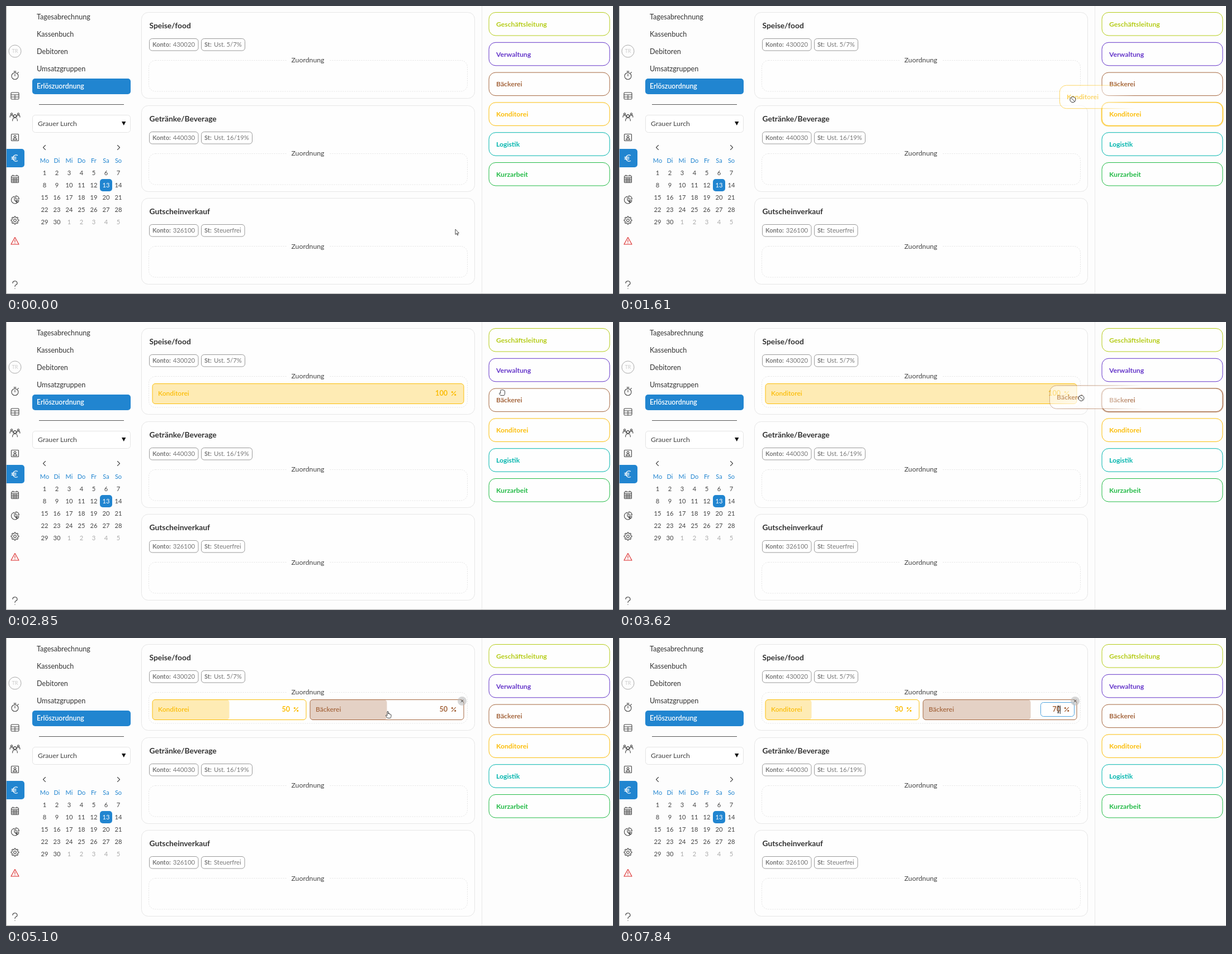
Recreate the animation shown at these times as an HTML page. Size 1086 by 516 pixels, loop 8000 ms.

```html
<!DOCTYPE html>
<html lang="de">
<head>
<meta charset="utf-8">
<title>Erlöszuordnung</title>
<style>
html, body { margin: 0; width: 100%; height: 100%; overflow: hidden; background: #fdfdfd; }
svg { display: block; width: 100vw; height: 100vh; font-family: Lato, "Open Sans", sans-serif; }
.icon { fill: none; stroke: #444; stroke-width: 1.1; stroke-linecap: round; stroke-linejoin: round; }
</style>
</head>
<body>
<svg id="stage" viewBox="0 0 1086 516"></svg>
<script>
const LOOP = 8000;
const BLUE = '#2185d0', YELLOW = '#fbbd08', BROWN = '#a5673f';
const DEPARTMENTS = [
  ['Geschäftsleitung', '#b5cc18'], ['Verwaltung', '#6435c9'], ['Bäckerei', BROWN],
  ['Konditorei', YELLOW], ['Logistik', '#00b5ad'], ['Kurzarbeit', '#21ba45']
];
const cardTop = i => 11.5 + 53.8 * i;

const text = (x, y, s, size, fill = '#333', weight = 400, anchor = 'start') =>
  `<text x="${x}" y="${y}" font-size="${size}" fill="${fill}" font-weight="${weight}" text-anchor="${anchor}">${s}</text>`;
const rect = (x, y, w, h, r, fill, stroke = 'none', extra = '') =>
  `<rect x="${x}" y="${y}" width="${w}" height="${h}" rx="${r}" fill="${fill}" stroke="${stroke}" ${extra}/>`;
const icon = (y, body, extra = '') => `<g class="icon" transform="translate(16 ${y})" ${extra}>${body}</g>`;
const path = (d, extra = '') => `<path d="${d}" ${extra}/>`;

function sidebar() {
  const teeth = Array.from({ length: 8 }, (_, i) => {
    const at = (r, k) => {
      const a = (i + k) * Math.PI / 4;
      return (r * Math.cos(a)).toFixed(2) + ' ' + (r * Math.sin(a)).toFixed(2);
    };
    return `${i ? 'L' : 'M'}${at(7, -0.18)}L${at(7, 0.18)}L${at(5.3, 0.32)}L${at(5.3, 0.68)}`;
  }).join('') + 'Z';
  const person = (x, y, r) =>
    `<circle cx="${x}" cy="${y}" r="${r}"/>` +
    path(`M${x - r * 1.8} ${y + r * 3.6}v-1a${r * 1.8} ${r * 1.8} 0 0 1 ${r * 3.6} 0v1`);
  return `<circle cx="16" cy="81" r="11" fill="none" stroke="#aaa"/>` +
    text(16, 84.3, 'TR', 9, '#ccc', 400, 'middle') +
    icon(124, '<circle cy="1.5" r="6"/>' + path('M0 1.5V-2M-2-7H2M0-7v2M5-4l1.3-1.3')) +
    icon(161, rect(-7, -6, 14, 12, 1.5, 'none', '#444') + path('M-7-2H7M-7 2H7M0-2V6')) +
    icon(198, person(0, -1, 2.4) + person(-6, -4.5, 1.6) + person(6, -4.5, 1.6)) +
    icon(235.5, rect(-6.5, -6, 13, 12, 1, 'none', '#444') + '<circle cy="-1.5" r="1.9"/>' + path('M-3.5 4a3.5 2.8 0 0 1 7 0z')) +
    path('M0 256h28a5 5 0 0 1 5 5v23a5 5 0 0 1-5 5H0z', `fill="${BLUE}"`) +
    icon(272.5, path('M4.5-5A5.6 5.6 0 1 0 4.5 5M-6-1.5H2M-6 1.5H2', 'stroke="#fff" stroke-width="1.3"')) +
    icon(310, rect(-6.5, -5.5, 13, 12, 1, 'none', '#444') + path('M-6.5-2.5h13M-6.5 .5h13M-6.5 3.5h13M-3-2.5v9M0-2.5v9M3-2.5v9M-3.5-7.5v2M3.5-7.5v2')) +
    icon(347, path('M-1-6A6.5 6.5 0 1 0 4 5.5L-1 .5zM1.5-7A6 6 0 0 1 7.3-1H1.5zM2 1.5H7A6 6 0 0 1 5.3 4.8z')) +
    icon(384, path(teeth) + '<circle r="2.3"/>') +
    icon(421, path('M0-6.5L7 6H-7zM0-2V2M0 4v.2', 'stroke="#db2828"')) +
    icon(500, path('M-4-3.5A4 3.6 0 1 1 1.5-.3Q0 .4 0 2.6M0 6v.2', 'stroke-width="1.2"'));
}

function menu() {
  const items = ['Tagesabrechnung', 'Kassenbuch', 'Debitoren', 'Umsatzgruppen'];
  let out = items.map((s, i) => text(55, 23.5 + 31.1 * i, s, 12.6)).join('');
  out += rect(47, 130, 176, 28, 5, BLUE) + text(55, 148, 'Erlöszuordnung', 12.3, '#fff', 600);
  out += path('M59 176.5H211', 'stroke="#555"');
  out += rect(47.5, 195.5, 175, 31, 5, '#fff', '#e4e4e4') + text(57, 215, 'Grauer Lurch', 12.3, '#444');
  out += path('M207 207h7.4l-3.7 7z', 'fill="#111"');
  out += `<g class="icon">${path('M70.5 249.5l-4 4 4 4M199.5 249.5l4 4-4 4')}</g>`;
  return out;
}

function calendar() {
  const colX = c => 69 + 22 * c;
  let out = ['Mo', 'Di', 'Mi', 'Do', 'Fr', 'Sa', 'So']
    .map((d, c) => text(colX(c), 281, d, 11, BLUE, 400, 'middle')).join('');
  out += rect(168, 310, 22, 22, 5, BLUE);
  for (let i = 0; i < 35; i++) {
    const fill = i === 12 ? '#fff' : i < 30 ? '#444' : '#aaa';
    out += text(colX(i % 7), 303 + 22 * Math.floor(i / 7), i % 30 + 1, 11.2, fill, 400, 'middle');
  }
  return out;
}

function account(i, title, number, tax, chipWidth) {
  const y = 166.7 * i;
  const row = Math.round(y);
  return rect(242.5, 12 + row - 0.5, 596, 154, 12, '#fefefe', '#e6e6e6') +
    text(256.5, 40 + y, title, 13.8, '#333', 700) +
    rect(256.5, 58.5 + row, 87.5, 21.5, 5, '#fff', '#999') +
    rect(349.5, 58.5 + row, chipWidth, 21.5, 5, '#fff', '#999') +
    text(262, 73 + y, 'Konto:', 11, '#777', 700) + text(338, 73 + y, number, 11.3, '#777', 400, 'end') +
    text(355, 73 + y, 'St:', 11, '#777', 700) + text(372, 73 + y, tax, 11.3, '#777') +
    rect(255.5, 97.5 + row, 570, 55.5, 12, 'none', '#e3e3e3', `stroke-dasharray="2 2" id="zone${i}"`) +
    rect(502, 90 + row, 76, 17, 4, '#fefefe') +
    text(540, 101.2 + y, 'Zuordnung', 12.3, '#444', 400, 'middle');
}

const departments = () => path('M851.5 0V515', 'stroke="#e8e8e8"') + DEPARTMENTS.map(([name, color], i) =>
  rect(863.5, cardTop(i), 217, 42, 12, 'none', color, `id="glow${i}" stroke-width="2.2" opacity="0"`) +
  rect(864, cardTop(i), 216, 41.5, 12, '#fefefe', color) +
  text(877, cardTop(i) + 25.3, name, 12.2, color, 700)).join('');

function share(id, x, name, color) {
  return `<g id="${id}">` +
    rect(x, 110.5, 0, 36, 5, color, 'none', 'class="fill" fill-opacity=".3"') +
    rect(x, 110.5, 0, 36, 5, 'none', color, 'class="edge"') +
    text(x + 10, 132.2, name, 12, color, 600) +
    `<g class="value"><g class="field" opacity="0">${rect(-64.5, 115.5, 60, 25, 5, '#fff', '#4fa3dd')}</g>` +
    rect(-44, 120, 15, 17, 0, '#3390ff', 'none', 'class="marked" opacity="0"') +
    text(-29, 132.4, '', 12.6, color, 700, 'end') +
    `<g transform="translate(-18 128)" stroke="${color}" fill="${color}" stroke-width="1.3" stroke-linecap="round">` +
    path('M-3.4 3.6L3.4-3.6') + '<circle cx="-2.7" cy="-2.4" r="1"/><circle cx="2.7" cy="2.4" r="1"/></g></g></g>';
}

const HAND = 'M-3.2 5.5C-5.5 3-6 1.5-4.8 1L-3.3 2V-3.5Q-2.3-5-1.4-3.6Q-.6-5.6.6-4.2Q2-5 2.5-3.2Q4.3-3.8 4.5-1.8V2Q4.3 4 3.2 5.5z';
const FIST = 'M-3.3 5C-5.5 2.5-5.2 0-3.6-.4Q-3.4-3-1.7-2.6Q-.6-4 .6-2.8Q2.2-3.4 2.8-2Q4.6-2 4.6 0V2Q4.4 4 3.2 5z';
const FINGER = 'M-1 0Q0-1.4 1 0V4Q2-.0 3 4.4Q4.2 3.6 4.6 5Q6 4.6 6 6V8.4Q5.6 10.4 4.8 11.5H-.4Q-3.4 8-3.6 6.6Q-2.8 5.4-1 7.2z';
const ARROW = 'M0 0V9.4L2.2 7.4 3.6 10.7 5 10.1 3.6 6.9H6.4z';

function cursors() {
  const shape = (id, d) => `<g id="${id}">${path(d, 'fill="#fff" stroke="#333" stroke-width=".9" stroke-linejoin="round"')}</g>`;
  return '<g id="cursor">' + shape('arrow', ARROW) + shape('hand', HAND) + shape('fist', FIST) + shape('finger', FINGER) +
    `<g id="beam">${path('M-2-6H2M0-6V6M-2 6H2', 'fill="none" stroke="#222"')}</g>` +
    `<g id="copy">${rect(3, 7.5, 5, 5, 0, '#fff', '#222')}${rect(5.5, 10.5, 5, 5, 0, '#fff', '#222')}</g>` +
    `<g id="deny" fill="#fff" stroke="#333"><circle r="5"/>${path('M-3.5-3.5L3.5 3.5')}</g></g>`;
}

const stage = document.getElementById('stage');
stage.innerHTML = `<defs>
  <radialGradient id="fade" gradientUnits="userSpaceOnUse" r="112">
    <stop stop-color="#fff" stop-opacity=".72"/><stop offset=".5" stop-color="#fff" stop-opacity=".5"/>
    <stop offset="1" stop-color="#fff" stop-opacity="0"/></radialGradient>
  <mask id="spot" maskUnits="userSpaceOnUse" x="-5" y="-5" width="230" height="55">
    <rect x="-5" y="-5" width="230" height="55" fill="url(#fade)"/></mask></defs>` +
  rect(0, 0, 1086, 516, 0, '#fdfdfd') + sidebar() + menu() + calendar() +
  account(0, 'Speise/food', '430020', 'Ust. 5/7%', 78) +
  account(1, 'Getränke/Beverage', '440030', 'Ust. 16/19%', 91) +
  account(2, 'Gutscheinverkauf', '326100', 'Steuerfrei', 77.5) +
  departments() +
  share('first', 262, 'Konditorei', YELLOW) + share('second', 544, 'Bäckerei', BROWN) +
  `<path id="caret" d="M789.5 121V136" stroke="#444"/>` +
  `<g id="badge" transform="translate(816 113)"><circle r="8" fill="#bbb" fill-opacity=".6"/>
    ${path('M-2.3-2.3L2.3 2.3M2.3-2.3L-2.3 2.3', 'stroke="#555"')}</g>` +
  `<g id="ghost" mask="url(#spot)">${rect(0.5, 0.5, 216, 41.5, 12, '#fff', '#999')}<text x="13" y="25.3" font-size="12.2" font-weight="700"></text></g>` +
  path('M.5 0V516M0 515.5H1086', 'stroke="#a5a5a5"') + cursors();

const $ = id => document.getElementById(id);
const show = (el, on) => el.setAttribute('opacity', +on);
const clamp = v => Math.max(0, Math.min(1, v));

// Pointer stops: time, x, y
const STOPS = [
  [0, 804, 400], [60, 804, 400], [820, 888, 193], [940, 888, 197], [1370, 888, 197],
  [1380, 879, 196], [1960, 687, 115], [2430, 687, 115], [2850, 888, 126], [3220, 916, 142],
  [3530, 916, 142], [3540, 838, 138], [3970, 720, 121], [4630, 720, 121], [5100, 683, 132],
  [5410, 786, 128], [LOOP, 786, 128]
];
function pointer(t) {
  const i = STOPS.findIndex(s => s[0] > t);
  const [t0, x0, y0] = STOPS[i - 1], [t1, x1, y1] = STOPS[i];
  const p = (t - t0) / (t1 - t0), e = p * p * (3 - 2 * p);
  return [x0 + (x1 - x0) * e, y0 + (y1 - y0) * e];
}

// Card index, pointer offset inside the card, start, end
const DRAGS = [[3, 24, 26, 1380, 2000], [2, 57, 23, 3540, 4120]];
const GLOWS = [[4, 580, 700], [3, 760, 2120], [2, 2900, 4650]];

function setShare(id, x, width, percent, label) {
  const g = $(id), right = x + width;
  show(g, width > 0);
  g.querySelector('.fill').setAttribute('width', width * percent / 100);
  g.querySelector('.edge').setAttribute('width', width);
  g.querySelector('.value').setAttribute('transform', `translate(${right} 0)`);
  g.querySelector('.value text').textContent = label;
}

function cursorKind(t, x, y, drag) {
  if (drag && t > drag[3] + 50) return x < 826 && y < 153 ? 'copy' : 'deny';
  if (t >= 1120 && t < 1440 || t >= 3180 && t < 3600) return 'fist';
  if (t > 5300) return 'beam';
  if (x > 864) return DEPARTMENTS.some((_, i) => y > cardTop(i) && y < cardTop(i) + 42) ? 'hand' : 'arrow';
  const onShare = x < 819 && y > 110 && y < 147;
  return onShare && (t > 2430 && t < 3220 || t > 4630) ? 'finger' : 'arrow';
}

function draw(t) {
  const [x, y] = pointer(t);
  const drag = DRAGS.find(d => t >= d[3] && t < d[4]);
  const kind = cursorKind(t, x, y, drag);

  const over = x < 826 && y < 153 && (t > 1380 && t < 2080 || t >= 3540 && t < 4120);
  $('zone0').setAttribute('fill', over ? '#dff0ff' : 'none');
  $('zone0').setAttribute('stroke', over ? '#c3ddf2' : '#e3e3e3');

  DEPARTMENTS.forEach((_, i) => {
    const g = GLOWS.find(s => s[0] === i);
    show($('glow' + i), g && t < g[2] ? 0.5 * clamp((t - g[1]) / 170) : 0);
  });

  const part = t < 4120 ? 0 : t < 7580 ? 50 : t < 7840 ? 7 : 70;
  setShare('first', 262, t < 2080 ? 0 : part ? 275 : 557, 100 - part, 100 - part);
  setShare('second', 544, part ? 275 : 0, part, part);

  const field = $('second').querySelector('.field');
  const marked = t >= 6570 && t < 7580;
  show(field, 0);
  field.setAttribute('opacity', clamp((t - 5440) / 240));
  show($('second').querySelector('.marked'), marked);
  $('second').querySelector('.value text').setAttribute('fill', marked ? '#fff' : BROWN);
  show($('caret'), t >= 7580);
  show($('badge'), kind === 'finger' || kind === 'beam');

  const ghost = $('ghost'), flying = drag && t > drag[3] + 30;
  show(ghost, !!flying);
  if (flying) {
    const [card, dx, dy] = drag, label = ghost.querySelector('text');
    ghost.setAttribute('transform', `translate(${x - dx} ${y - dy})`);
    label.textContent = DEPARTMENTS[card][0];
    label.setAttribute('fill', DEPARTMENTS[card][1]);
    ghost.querySelector('rect').setAttribute('stroke', DEPARTMENTS[card][1]);
    $('fade').setAttribute('cx', dx);
    $('fade').setAttribute('cy', dy);
  }

  $('cursor').setAttribute('transform', `translate(${x.toFixed(1)} ${y.toFixed(1)})`);
  for (const id of ['arrow', 'hand', 'fist', 'finger', 'beam', 'copy', 'deny']) {
    show($(id), id === kind || id === 'arrow' && kind === 'copy');
  }
}

const start = performance.now();
function tick() {
  draw((performance.now() - start) % LOOP);
  requestAnimationFrame(tick);
}
tick();
</script>
</body>
</html>
```
